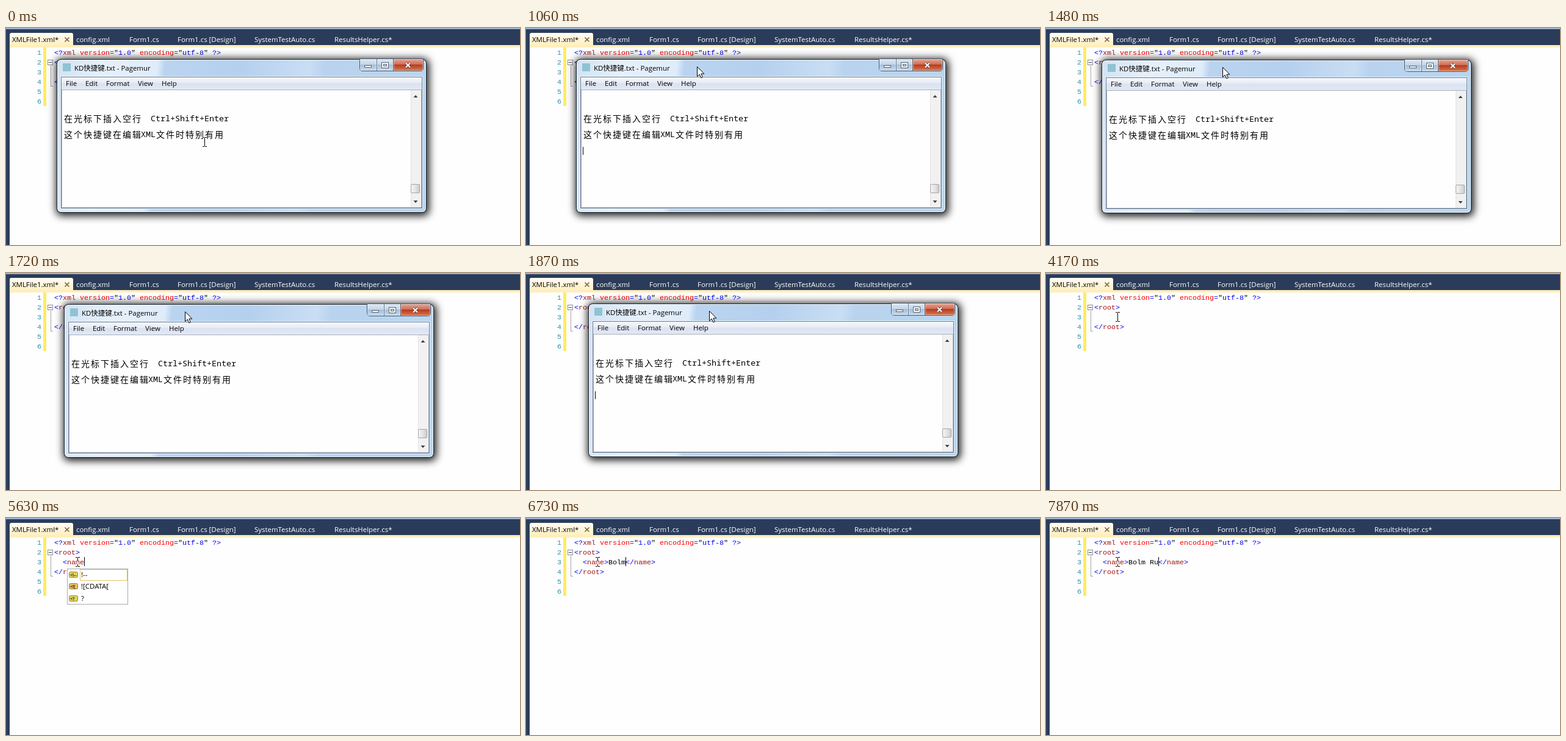
These frames come from a looping animation (842 px wide and 356 px high, 8 s). An HTML page with a canvas:

```html
<!DOCTYPE html>
<html lang="en">
<head>
<meta charset="utf-8">
<title>Editor session</title>
<style>
html, body { margin: 0; width: 100%; height: 100%; overflow: hidden; background: #fefefe; }
canvas { display: block; }
</style>
</head>
<body>
<canvas id="stage" width="842" height="356"></canvas>
<script>
const ctx = document.getElementById('stage').getContext('2d');
const LOOP = 8000;
const UI = '11.45px "Open Sans", "Noto Sans CJK SC", "Noto Sans CJK", sans-serif';
const CODE = '11.667px "Liberation Mono", monospace';
const NOTE = '13.33px "Noto Sans Mono", "DejaVu Sans Mono", monospace';
const HAN = '14px "Noto Sans CJK SC", "Noto Sans CJK", sans-serif';
const BLUE = '#0000ff', MAROON = '#a31515', RED = '#ff0000', BLACK = '#000';

// [time, dx, dy]: window offset while dragged
const DRAG = [[0, 0, 0], [1060, -1, 0], [1200, 1, 1], [1340, 4, 2], [1480, 8, 1],
  [1600, 12, 0], [1740, 17, -1], [1870, 19, -1], [2030, 14, -3]];

// [time, x, y, shape]: pointer path outside the drag
const POINTER = [[0, 325, 187, 'beam'], [150, 331, 165, 'beam'], [280, 333, 130, 'beam'],
  [410, 322, 88, 'arrow'], [540, 296, 68, 'arrow'], [680, 281, 63, 'arrow'],
  [2150, 262, 84, 'arrow'], [2290, 200, 128, 'beam'], [2430, 140, 153, 'beam'],
  [2570, 104, 162, 'beam'], [2710, 97, 163, 'beam'], [3260, 98, 142, 'beam'],
  [3390, 103, 110, 'beam'], [3520, 112, 85, 'beam'], [3650, 117, 72, 'beam']];

// [time, tag text, value, popup, caret column or -1]
const TYPING = [[0, '', '', 0, -1], [3650, '', '', 0, 0], [4170, '', '', 0, -1],
  [4420, '<', '', 0, 1], [4570, '<', '', 1, 1], [5010, '<', '', 1, -1],
  [5320, '<n', '', 1, 2], [5460, '<na', '', 1, 3], [5630, '<name', '', 1, 5],
  [6020, '<name>', '', 0, 6], [6430, '<name>', 'B', 0, 7], [6730, '<name>', 'Bolm', 0, 10],
  [7160, '<name>', 'Bolm ', 0, 11], [7600, '<name>', 'Bolm R', 0, 12], [7870, '<name>', 'Bolm Ru', 0, 13]];

const at = (keys, t) => keys.reduce((found, k) => k[0] <= t ? k : found);
const within = (t, a, b) => t >= a && t < b;

function rect(x, y, w, h, fill) {
  ctx.fillStyle = fill;
  ctx.fillRect(x, y, w, h);
}

function frame(x, y, w, h, color) {
  ctx.strokeStyle = color;
  ctx.lineWidth = 1;
  ctx.strokeRect(x + .5, y + .5, w - 1, h - 1);
}

function text(str, x, y, font, color = BLACK) {
  ctx.font = font;
  ctx.fillStyle = color;
  ctx.fillText(str, x, y);
}

function shape(points, fill) {
  ctx.beginPath();
  points.forEach(([x, y]) => ctx.lineTo(x, y));
  ctx.closePath();
  ctx.fillStyle = fill;
  ctx.fill();
}

function round(x, y, w, h, r) {
  ctx.beginPath();
  ctx.roundRect(x, y, w, h, r);
}

function blend(x0, y0, x1, y1, stops) {
  const g = ctx.createLinearGradient(x0, y0, x1, y1);
  stops.forEach(([p, c]) => g.addColorStop(p, c));
  return g;
}

function cross(x, y, r, color, width) {
  ctx.strokeStyle = color;
  ctx.lineWidth = width;
  ctx.beginPath();
  ctx.moveTo(x - r, y - r); ctx.lineTo(x + r, y + r);
  ctx.moveTo(x + r, y - r); ctx.lineTo(x - r, y + r);
  ctx.stroke();
}

// Monospaced run of [string, colour] parts on 7px cells
function code(x, y, ...parts) {
  for (const [str, color] of parts) {
    text(str, x, y, CODE, color);
    x += 7 * str.length;
  }
}

function tabs() {
  rect(0, 0, 842, 32, '#2b3c5a');
  rect(0, 0, 6, 356, '#2d3e5d');
  rect(0, 0, 842, 2, '#9cb2d1');
  round(6, 8, 104, 24, [3, 3, 0, 0]);
  ctx.fillStyle = blend(0, 8, 0, 30, [[0, '#fffdf6'], [.5, '#fff5d8'], [1, '#ffeebc']]);
  ctx.fill();
  rect(6, 28, 836, 4, '#ffeebc');
  text('XMLFile1.xml*', 10, 23, UI);
  cross(100, 19, 3.5, '#75633d', 1.6);
  [['config.xml', 115], ['Form1.cs', 202], ['Form1.cs [Design]', 281],
    ['SystemTestAuto.cs', 407], ['ResultsHelper.cs*', 538]].forEach(([s, x]) => text(s, x, 23, UI, '#fff'));
}

function editor(t) {
  rect(0, 0, 842, 356, '#fefefe');
  tabs();
  rect(61, 32, 5, 96, '#ffec62');
  for (let i = 1; i <= 6; i++) text(i, 51, 28 + 16 * i, CODE, '#2b91af');

  frame(68, 52, 9, 9, '#8c8c8c');
  rect(70, 56, 5, 1, '#444');
  rect(73, 62, 1, 34, '#a5a5a5');
  rect(73, 95, 4, 1, '#a5a5a5');

  code(79, 44, ['<?', BLUE], ['xml', MAROON], [' version', RED], ['=', BLUE], ['"', BLACK], ['1.0', BLUE],
    ['"', BLACK], [' encoding', RED], ['=', BLUE], ['"', BLACK], ['utf-8', BLUE], ['"', BLACK], [' ?>', BLUE]);
  code(79, 60, ['<', BLUE], ['root', MAROON], ['>', BLUE]);
  code(79, 92, ['</', BLUE], ['root', MAROON], ['>', BLUE]);

  const [, tag, value, popup, caret] = at(TYPING, t);
  code(93, 76, [tag.slice(0, 1), BLUE], [tag.slice(1, 5), MAROON], [tag.slice(5), BLUE], [value, BLACK]);
  if (tag.endsWith('>')) code(135 + 7 * value.length, 76, ['</', BLUE], ['name', MAROON], ['>', BLUE]);
  if (caret >= 0) rect(93 + 7 * caret, 64, 1, 15, BLACK);
  if (within(t, 2840, 3390)) rect(78, 112, 1, 15, BLACK);
  if (popup) suggestions();
}

function suggestions() {
  rect(100, 83, 100, 59, '#fff');
  frame(100, 83, 100, 59, '#a9a9a9');
  frame(121, 84, 78, 19, '#e5c365');
  [['!--', '<!--', '#ded65c'], ['![CDATA[', '<![', '#e9bd62'], ['?', '<?', '#ded65c']].forEach(([s, mark, fill], i) => {
    const y = Math.round(88 + 19.3 * i);
    round(103.5, y + .5, 14, 9, 2);
    ctx.fillStyle = fill;
    ctx.fill();
    ctx.strokeStyle = '#8d8440';
    ctx.lineWidth = 1;
    ctx.stroke();
    text(mark, 105, y + 8, 'bold 7px "Open Sans", sans-serif', '#222');
    text(s, 123, y + 9, UI);
  });
}

function buttons() {
  round(579.5, 50.5, 104, 20, [0, 0, 4, 4]);
  ctx.fillStyle = blend(0, 51, 0, 70, [[0, '#dce8f4'], [.48, '#c3d5e8'], [.5, '#a6bfd9'], [1, '#c4daee']]);
  ctx.fill();
  ctx.save();
  ctx.clip();
  rect(634, 51, 50, 20, blend(0, 51, 0, 70, [[0, '#e3a797'], [.46, '#cf6c56'], [.5, '#b93a21'], [1, '#d37a4c']]));
  ctx.restore();
  ctx.strokeStyle = '#465567';
  ctx.lineWidth = 1;
  ctx.stroke();
  rect(607, 51, 1, 19, '#5f7186');
  rect(634, 51, 1, 19, '#5e4a50');
  // Inner glass edge of each button
  [[580, 27], [608, 26], [635, 48]].forEach(([x, w]) => frame(x, 51, w, 19, 'rgba(255,255,255,.45)'));
  rect(587, 61, 12, 4, '#5b6470');
  rect(588, 62, 10, 2, '#fff');
  rect(615, 56, 12, 10, '#5b6470');
  rect(616, 57, 10, 8, '#fff');
  rect(618, 59, 6, 4, '#5b6470');
  rect(619, 60, 4, 2, '#c8d7e6');
  cross(658.5, 61, 3.7, '#6b3a35', 4);
  cross(658.5, 61, 3.5, '#fff', 2.2);
}

function scrollbar() {
  rect(663, 102, 17, 192, '#f1f1f1');
  rect(663, 102, 1, 192, '#e2e2e2');
  shape([[667.5, 114], [671, 110], [674.5, 114]], '#404040');
  shape([[667.5, 283], [671, 287], [674.5, 283]], '#404040');
  round(663.5, 256.5, 14, 14, 1.5);
  ctx.fillStyle = blend(663, 0, 678, 0, [[0, '#f6f6f6'], [.5, '#e4e4e4'], [1, '#c9cacc']]);
  ctx.fill();
  ctx.strokeStyle = '#a2a5a9';
  ctx.lineWidth = 1;
  ctx.stroke();
}

// Soft shadow alone: the caster stands off stage
function shadow(x, y, w, h) {
  ctx.save();
  ctx.shadowColor = 'rgba(0,0,0,.9)';
  ctx.shadowBlur = 13;
  ctx.shadowOffsetX = 2000;
  round(x - 2000, y, w, h, 9);
  ctx.fill();
  ctx.restore();
}

function notes(caretOn) {
  shadow(82, 50, 611, 258);
  round(83, 51, 606, 252, 7);
  ctx.fillStyle = '#17222e';
  ctx.fill();
  round(84, 52, 604, 250, 6);
  ctx.fillStyle = '#eef6fd';
  ctx.fill();
  round(85, 53, 602, 248, 5);
  ctx.fillStyle = blend(85, 53, 687, 110, [[0, '#d3e3f3'], [.12, '#e6f0fa'], [.27, '#dfecf9'],
    [.29, '#bad4f0'], [.5, '#b5d0ee'], [.68, '#c9def4'], [.72, '#b9d3ef'], [1, '#b9d5ef']]);
  ctx.fill();

  rect(93, 58, 13, 13, '#8fc3d3');
  text('KD快捷键.txt - Pagemur', 112, 70, UI);
  buttons();

  frame(89, 79, 594, 218, '#e8f2fb');
  frame(90, 80, 592, 216, '#6a7c90');
  rect(91, 81, 590, 20, blend(0, 81, 0, 101, [[0, '#f6f8fc'], [.45, '#e6ebf5'], [.5, '#dbe2f0'], [1, '#e2e8f4']]));
  [['File', 98], ['Edit', 130], ['Format', 164], ['View', 216], ['Help', 255]]
    .forEach(([s, x]) => text(s, x, 95, UI));
  rect(91, 101, 590, 194, '#fefefe');
  frame(91, 101, 590, 194, '#a9b1bd');
  scrollbar();

  ctx.letterSpacing = '2px';
  text('在光标下插入空行', 95, 154, HAN);
  text('这个快捷键在编辑', 95, 180, HAN);
  text('文件时特别有用', 246, 180, HAN);
  ctx.letterSpacing = '0px';
  text('Ctrl+Shift+Enter', 237, 153, NOTE);
  text('XML', 221, 179, NOTE);
  if (caretOn) rect(94, 195, 1, 13, BLACK);
}

// The beam inverts what lies below it
function beam(x, y) {
  ctx.save();
  ctx.globalCompositeOperation = 'difference';
  rect(x, y - 7, 1, 14, '#fff');
  for (const dy of [-8, 7]) {
    rect(x - 3, y + dy, 3, 1, '#fff');
    rect(x + 1, y + dy, 3, 1, '#fff');
  }
  ctx.restore();
}

function arrow(x, y) {
  ctx.save();
  ctx.translate(x + .5, y + .5);
  shape([[0, 0], [0, 16], [3.7, 12.6], [6.3, 18.4], [8.8, 17.3], [6.3, 11.6], [11.3, 11.6]], '#fff');
  ctx.strokeStyle = BLACK;
  ctx.lineWidth = 1;
  ctx.stroke();
  ctx.restore();
}

function draw(t) {
  const [, dx, dy] = at(DRAG, t);
  editor(t);
  if (t < 2840) {
    ctx.save();
    ctx.translate(dx, dy);
    notes(within(t, 410, 1200) || t >= 1740);
    ctx.restore();
  }
  const [, x, y, kind] = at(POINTER, t);
  const held = within(t, 680, 2150);
  if (kind === 'beam') beam(x, y);
  else arrow(x + (held ? dx : 0), y + (held ? dy : 0));
}

const start = performance.now();
function tick() {
  draw((performance.now() - start) % LOOP);
  requestAnimationFrame(tick);
}
tick();
</script>
</body>
</html>
```
